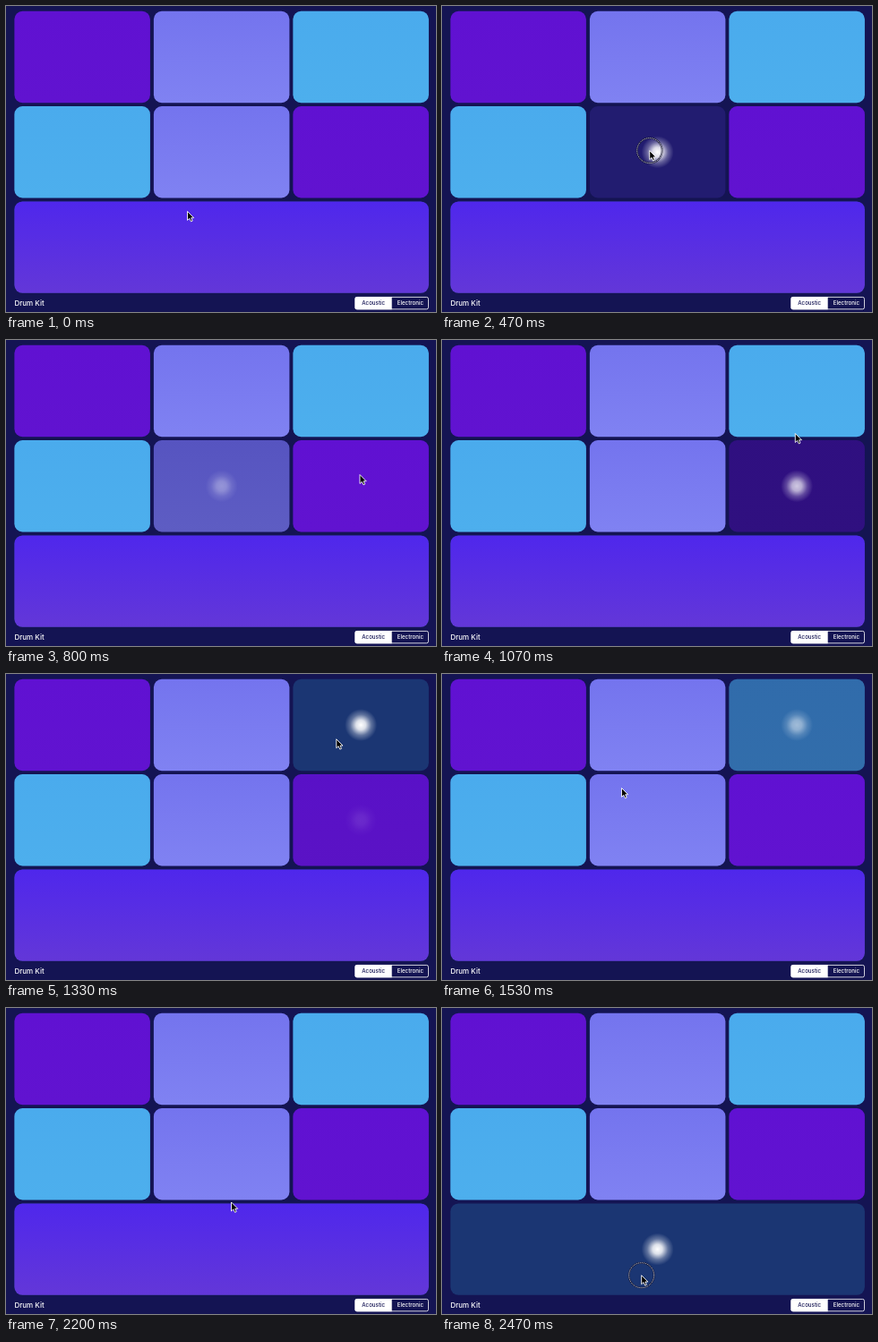
Write an HTML page that moves like this. It is 480 by 342 pixels and loops after 2.54 s.

```html
<!DOCTYPE html>
<html lang="en">
<head>
<meta charset="utf-8">
<title>Drum Kit</title>
<style>
  html, body { margin: 0; width: 100%; height: 100%; overflow: hidden; background: #141453; }
  svg { display: block; width: 480px; height: 342px; }
  text { font-family: Inter, "Open Sans", sans-serif; fill: #fff; }
  .title { font-size: 8px; font-weight: 500; }
  .tab { font-size: 6.2px; font-weight: 500; text-anchor: middle; }
</style>
</head>
<body>
<svg viewBox="0 0 480 342" xmlns="http://www.w3.org/2000/svg">
  <defs>
    <linearGradient id="violet" x2="0" y2="1"><stop stop-color="#6011d2"/><stop offset="1" stop-color="#6113d0"/></linearGradient>
    <linearGradient id="lilac" x2="0" y2="1"><stop stop-color="#7474ee"/><stop offset="1" stop-color="#8082f2"/></linearGradient>
    <linearGradient id="sky" x2="0" y2="1"><stop stop-color="#4aabed"/><stop offset="1" stop-color="#4dafed"/></linearGradient>
    <linearGradient id="indigo" x2="0" y2="1"><stop stop-color="#4f27ec"/><stop offset="1" stop-color="#6337d8"/></linearGradient>
    <radialGradient id="glow">
      <stop stop-color="#fff"/>
      <stop offset=".3" stop-color="#fff" stop-opacity=".85"/>
      <stop offset=".65" stop-color="#fff" stop-opacity=".3"/>
      <stop offset="1" stop-color="#fff" stop-opacity="0"/>
    </radialGradient>
  </defs>
  <rect width="480" height="342" fill="#141453"/>
  <g id="pads"></g>

  <text class="title" x="9.4" y="334.6">Drum Kit</text>
  <rect x="389.9" y="325.4" width="81.6" height="13.4" rx="2" fill="none" stroke="#fff" stroke-width=".8"/>
  <path d="M430.7 325H391.5a2 2 0 0 0-2 2V337.200a2 2 0 0 0 2 2H430.700Z" fill="#fff"/>
  <text class="tab" x="410.2" y="334.200" style="fill:#141453">Acoustic</text>
  <text class="tab" x="451.4" y="334.200">Electronic</text>

  <g id="cursor">
    <g id="ring" fill="none">
      <circle r="14" stroke="#15152f" stroke-width="2" stroke-opacity=".75"/>
      <circle r="14" stroke="#d8d8e0" stroke-width="1" stroke-dasharray="1 1"/>
    </g>
    <path d="M0 0V10L2.300 7.900 4 11.400 5.700 10.600 4.200 7.300H7.200Z" fill="#000" stroke="#fff" stroke-width=".9" stroke-linejoin="round"/>
  </g>
</svg>
<script>
  const LOOP = 2540, STEP = 1000 / 15, HOLD = 110, FADE = 400, RING = 80;
  const NS = 'http://www.w3.org/2000/svg';
  const $ = id => document.getElementById(id);

  // column, row, columns spanned, fill, pressed colour, hit time
  const pads = [
    [0, 0, 1, 'violet', '#210f68'],
    [1, 0, 1, 'lilac', '#221c70'],
    [2, 0, 1, 'sky', '#1b3673', 1240],
    [0, 1, 1, 'sky', '#1b3673', 1680],
    [1, 1, 1, 'lilac', '#221c70', 435],
    [2, 1, 1, 'violet', '#210f68', 865],
    [0, 2, 3, 'indigo', '#1b3673', 2440]
  ].map(makePad);

  // time, x, y
  const path = [
    [0, 202.5, 229.5],
    [420, 235, 162],
    [490, 236, 162],
    [800, 395, 150.500],
    [900, 396, 150],
    [1230, 389, 62],
    [1330, 371, 72],
    [1670, 99, 162],
    [1800, 115, 169],
    [2200, 251.5, 217],
    [2430, 224, 295],
    [LOOP, 224, 295]
  ];

  function add(parent, name, attrs) {
    const el = document.createElementNS(NS, name);
    for (const key in attrs) el.setAttribute(key, attrs[key]);
    return parent.appendChild(el);
  }

  function makePad([col, row, span, fill, dark, hit]) {
    const box = {
      x: 9.4 + col * 155.5, y: 5.800 + row * 106.3,
      width: 151.5 + (span - 1) * 155.5, height: 102.400, rx: 9
    };
    add($('pads'), 'rect', { ...box, fill: hit ? dark : `url(#${fill})` });
    if (!hit) return { hit };
    const face = add($('pads'), 'rect', { ...box, fill: `url(#${fill})` });
    const glow = add($('pads'), 'circle', {
      cx: box.x + box.width / 2, cy: box.y + box.height / 2, r: 18, fill: 'url(#glow)'
    });
    return { hit, face, glow };
  }

  const clamp = v => Math.max(0, Math.min(1, v));

  function slope(i, k) {
    const a = path[i - 1], b = path[i + 1];
    return a && b ? (b[k] - a[k]) / (b[0] - a[0]) : 0;
  }

  // Cubic Hermite curve through the path points
  function cursorAt(t) {
    let i = 0;
    while (i < path.length - 2 && t >= path[i + 1][0]) i++;
    const a = path[i], b = path[i + 1], d = b[0] - a[0], u = (t - a[0]) / d, v = 1 - u;
    return [1, 2].map(k =>
      (1 + 2 * u) * v * v * a[k] + u * v * v * d * slope(i, k) +
      u * u * (3 - 2 * u) * b[k] - u * u * v * d * slope(i + 1, k));
  }

  function draw(t) {
    let ring = false;
    for (const { hit, face, glow } of pads) {
      if (!hit) continue;
      const age = t - hit;
      const lit = age < 0 ? 1 : clamp((age - HOLD) / FADE);
      face.setAttribute('opacity', lit);
      glow.setAttribute('opacity', 1 - lit);
      if (age >= 0 && age < RING) ring = true;
    }
    $('ring').setAttribute('visibility', ring ? 'visible' : 'hidden');
    $('cursor').setAttribute('transform', `translate(${cursorAt(t)})`);
  }

  const start = performance.now();
  function tick() {
    const t = (performance.now() - start) % LOOP;
    draw(Math.min(37, Math.floor((t + 4) / STEP)) * STEP);
    requestAnimationFrame(tick);
  }
  tick();
</script>
</body>
</html>
```
